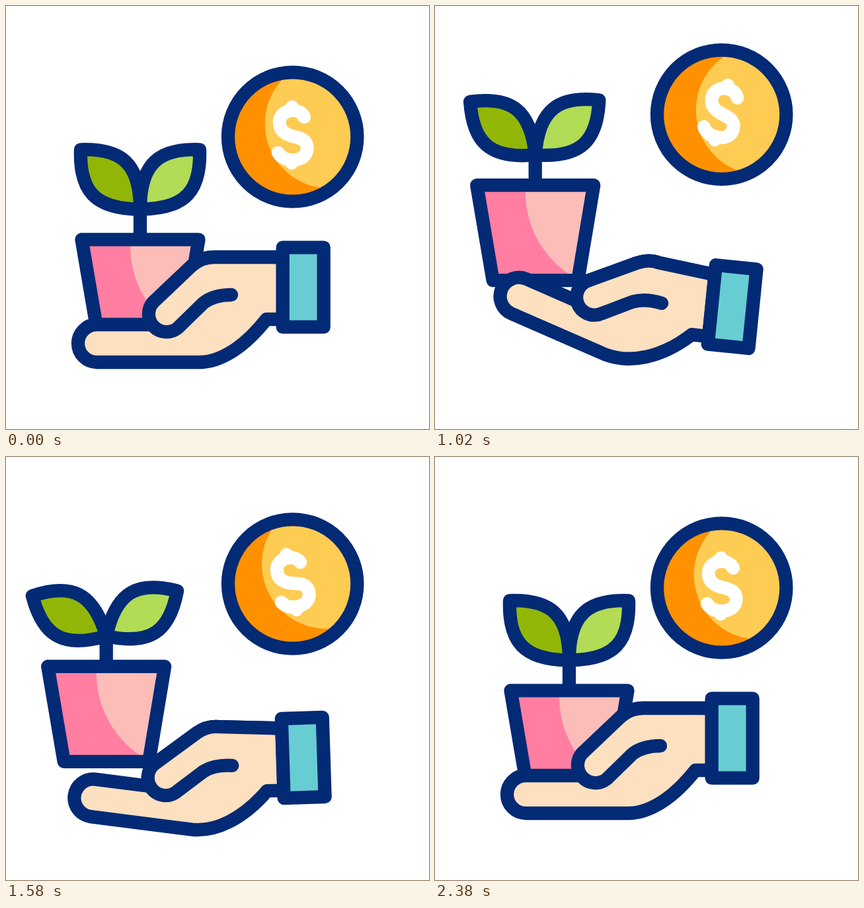
An HTML page for the animation above (2400 ms loop, 640 px wide and 640 px high).

```html
<!DOCTYPE html>
<html lang="en">
<head>
<meta charset="utf-8">
<title>Growing savings</title>
<style>
  html, body { margin: 0; width: 100%; height: 100%; overflow: hidden; background: #fff; }
  svg { display: block; width: 100%; height: 100%; }
  .ink { stroke: #032a75; stroke-width: 20.3; stroke-linecap: round; stroke-linejoin: round; }
  .spark { stroke: #ff6251; stroke-width: 20.5; stroke-linecap: round; }
</style>
</head>
<body>
<svg viewBox="0 0 640 640" fill="none">
  <defs>
    <clipPath id="face"><circle r="96"/></clipPath>
    <path id="leaf" d="M0 0C0 -70 29 -92 90 -90C92 -29 70 0 0 0Z"/>
    <path id="pot" d="M-88.5 0H88.5L64.5 144H-64Z"/>
  </defs>

  <!-- origin: middle of the pot rim -->
  <g id="plant">
    <g transform="translate(0 -46)">
      <g id="leftLeaf"><use href="#leaf" class="ink" fill="#92b607" transform="scale(-1 1)"/></g>
      <g id="rightLeaf"><use href="#leaf" class="ink" fill="#b2db56"/></g>
    </g>
    <path class="ink" d="M0 -46V0"/>
    <use href="#pot" fill="#ff7ea1"/>
    <path fill="#fcbdb9" d="M-15 0V10A151 151 0 0 0 50 134L64 144L88.5 0Z"/>
    <use href="#pot" class="ink"/>
  </g>

  <path id="palm" class="ink" fill="#fce0bf"/>
  <path id="thumb" class="ink" fill="#fce0bf"/>
  <rect id="cuff" class="ink" fill="#68cdd2" x="-31" y="-60.2" width="62" height="120.4"/>

  <g id="coin">
    <g id="coinFace">
      <circle r="97" fill="#ff9100"/>
      <circle cx="56" cy="-20" r="98" fill="#fecb53" clip-path="url(#face)"/>
      <g stroke="#fff" stroke-width="20" stroke-linecap="round">
        <path d="M17.5 -30C14 -37 7 -40 0 -40C-12 -40 -20 -32 -20 -22C-20 -9 -11 -4 0 -1C13 2 22 5 22 17C22 29 12 35 0 35C-9 35 -17 32 -22 24"/>
        <path d="M-1 -45.5V-42M-1.5 39.5V36"/>
      </g>
    </g>
    <circle class="ink" r="97.7"/>
    <circle id="ring" r="97.7" stroke="#ff6251" stroke-width="23.5" stroke-linecap="round" pathLength="360"/>
  </g>

  <line id="sparkA" class="spark"/>
  <line id="sparkB" class="spark"/>
</svg>

<script>
const LOOP = 2400;
const BEATS = [220, 610, 1220, 1800, 2200];
const COIN_BEATS = [220, 460, 940, 1340, 1810, 2160];

const el = id => document.getElementById(id);
const set = (id, attrs) => {
  for (const name in attrs) el(id).setAttribute(name, attrs[name]);
};

// Sine ease in and out, 0 before the start and 1 after the end.
function ease(t, start, end) {
  const u = Math.min(1, Math.max(0, (t - start) / (end - start)));
  return (1 - Math.cos(Math.PI * u)) / 2;
}

// Swings from one value to the next, reaching each on its beat.
const swing = (t, beats, values) => values.slice(1).reduce(
  (sum, value, i) => sum + (value - values[i]) * ease(t, beats[i], beats[i + 1]), values[0]);

const rotate = (x, y, deg) => {
  const a = deg * Math.PI / 180, c = Math.cos(a), s = Math.sin(a);
  return [x * c - y * s, x * s + y * c];
};

// Bends the arm: rigid cuff, rigid fingers, and an even curl across the wrist.
const CUFF = [449.7, 425.5], WRIST = 410, KNUCKLE = 290, SPINE = 447;
function bender(drop, cuff, finger) {
  const [wx, wy] = rotate(WRIST - CUFF[0], SPINE - CUFF[1], cuff);
  const origin = [CUFF[0] + wx, CUFF[1] + drop + wy];
  return (x, y) => {
    const curled = Math.max(0, Math.min(WRIST - x, WRIST - KNUCKLE));
    const angle = cuff + (finger - cuff) * curled / (WRIST - KNUCKLE);
    const [sx, sy] = rotate(-curled, 0, (cuff + angle) / 2);
    const [px, py] = rotate(x - WRIST + curled, y - SPINE, angle);
    return [origin[0] + sx + px, origin[1] + sy + py];
  };
}

function drawHand(t) {
  const drop = 29.5 * swing(t, BEATS, [0, 1, 1, 1, 0]);
  const cuff = swing(t, BEATS, [0, -6, 9.5, -7, 0]);
  const finger = swing(t, [220, 1240, 1850, 2150], [0, 26.5, -6, 0]);
  const bend = bender(drop, cuff, finger);
  const at = (...xy) => {
    let out = "";
    for (let i = 0; i < xy.length; i += 2) {
      out += bend(xy[i], xy[i + 1]).map(n => n.toFixed(2)).join(" ") + " ";
    }
    return out;
  };
  set("palm", { d:
    "M" + at(419, 474) + "L" + at(394, 474) +
    "C" + at(360, 517, 324, 539, 292, 539) + "L" + at(137.5, 539) +
    "A28.5 28.5 0 0 1 " + at(137.5, 482) + "L" + at(218, 482) +
    "L" + at(222, 449) + "L" + at(281, 393) +
    "C" + at(291, 384, 302, 380, 315, 380) + "L" + at(419, 380) + "Z" });
  set("thumb", { d:
    "M" + at(419, 380) + "L" + at(315, 380) +
    "C" + at(302, 380, 291, 384, 281, 393) + "L" + at(222, 449) +
    "A27 27 0 0 0 " + at(260, 487) + "L" + at(299, 449) +
    "C" + at(311, 440, 324, 437, 341, 437) });
  set("cuff", { transform: `translate(${CUFF[0]} ${CUFF[1] + drop}) rotate(${cuff})` });
}

function drawPlant(t) {
  const x = 203 - 51.3 * (ease(t, 220, 610) - ease(t, 1800, 2160));
  const rise = 88 * ease(t, 220, 1220) ** 0.7;
  const fall = 83 * ease(t, 1240, 1830) + 5 * ease(t, 2000, 2250);
  const tilt = swing(t, BEATS, [0, 24, 0, 24, 0]);
  set("plant", { transform: `translate(${x} ${353.3 - rise + fall})` });
  set("leftLeaf", { transform: `rotate(${-tilt})` });
  set("rightLeaf", { transform: `rotate(${tilt * 0.76})` });
}

function drawCoin(t) {
  const y = 198 + swing(t, COIN_BEATS, [0, 30, -41, 33, -42, 0]);
  const tilt = swing(t, [220, 470, 1010, 1550, 1990, 2390], [0, -9, 13, -11, 10, 0]);
  set("coin", { transform: `translate(433.7 ${y})` });
  set("coinFace", { transform: `rotate(${tilt})` });

  const head = 360 * ease(t, 480, 800), tail = 360 * ease(t, 685, 960);
  set("ring", {
    "stroke-dasharray": `${head - tail} 720`,
    "stroke-dashoffset": -tail,
    visibility: head > tail ? "visible" : "hidden"
  });
}

function drawSpark(id, t, x, y, dx, dy) {
  const head = ease(t, 1930, 2160), tail = ease(t, 2010, 2270);
  set(id, {
    x1: x + dx * tail, y1: y + dy * tail,
    x2: x + dx * head, y2: y + dy * head,
    visibility: head > tail ? "visible" : "hidden"
  });
}

function draw(t) {
  drawPlant(t);
  drawHand(t);
  drawCoin(t);
  drawSpark("sparkA", t, 508.2, 74.3, 9.5, -44);
  drawSpark("sparkB", t, 542, 97, 33, -30.5);
}

const start = performance.now();
function tick() {
  draw((performance.now() - start) % LOOP);
  requestAnimationFrame(tick);
}
tick();
</script>
</body>
</html>
```
